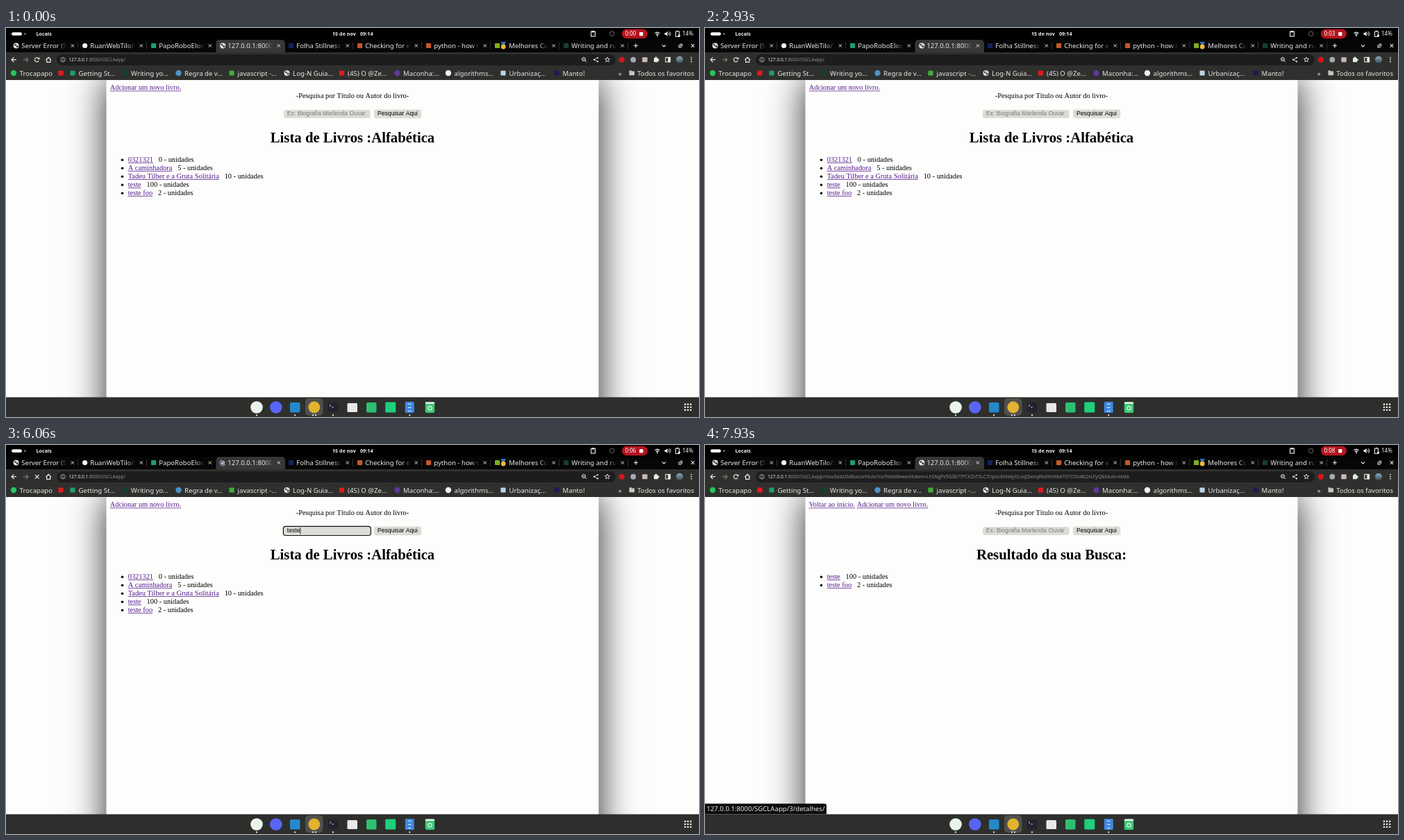
These frames come from a looping animation (998 px wide and 561 px high, 8 s). An HTML page with a canvas:

```html
<!DOCTYPE html>
<html lang="pt-BR">
<head>
<meta charset="utf-8">
<title>Lista de Livros</title>
<style>
html, body { margin: 0; width: 100%; height: 100%; overflow: hidden; background: #fdfdfc; }
canvas { display: block; width: 998px; height: 561px; }
</style>
</head>
<body>
<canvas id="stage"></canvas>
<script>
const W = 998, H = 561, LOOP = 8000;
const cv = document.getElementById('stage');
const dpr = window.devicePixelRatio || 1;
cv.width = W * dpr;
cv.height = H * dpr;
const c = cv.getContext('2d');
c.scale(dpr, dpr);

const UI = '9.6px "Noto Sans", sans-serif';
const URL_FONT = '6.6px "Noto Sans", sans-serif';
const BAR = 'bold 7.2px "Noto Sans", sans-serif';
const PAGE = '10.38px "Liberation Serif", serif';
const HEAD = 'bold 20.76px "Liberation Serif", serif';
const FORM = '8.65px "Liberation Sans", sans-serif';
const LIGHT = '#e8e8e6', DIM = '#8d8e8b', LINK = '#551a8b', PANEL = '#2f302d';

function text(s, x, y, font, color, align = 'left') {
  c.font = font;
  c.fillStyle = color;
  c.textAlign = align;
  c.fillText(s, x, y);
  return c.measureText(s).width;
}
function rect(x, y, w, h, color, r = 0) {
  c.fillStyle = color;
  c.beginPath();
  c.roundRect(x, y, w, h, r);
  c.fill();
}
function disc(x, y, r, color) {
  c.fillStyle = color;
  c.beginPath();
  c.arc(x, y, r, 0, 7);
  c.fill();
}
function ring(x, y, r, color, lw = 1, a = 0, b = Math.PI * 2) {
  c.strokeStyle = color;
  c.lineWidth = lw;
  c.beginPath();
  c.arc(x, y, r, a, b);
  c.stroke();
}
// Each argument after lw is one polyline: [x0, y0, x1, y1, ...]
function line(color, lw, ...paths) {
  c.strokeStyle = color;
  c.lineWidth = lw;
  c.beginPath();
  for (const p of paths)
    for (let i = 0; i < p.length; i += 2) c[i ? 'lineTo' : 'moveTo'](p[i], p[i + 1]);
  c.stroke();
}
function poly(color, ...p) {
  c.fillStyle = color;
  c.beginPath();
  for (let i = 0; i < p.length; i += 2) c.lineTo(p[i], p[i + 1]);
  c.fill();
}
function cross(x, y, r, color, lw = 1) {
  line(color, lw, [x - r, y - r, x + r, y + r], [x + r, y - r, x - r, y + r]);
}
function globe(x, y, r = 4) {
  disc(x, y, r, '#e4e5e3');
  disc(x - r * .3, y - r * .3, r * .35, '#3c3d3b');
  disc(x + r * .4, y + r * .25, r * .38, '#3c3d3b');
}
function badge(kind, x, y, color, r = 4) {
  if (kind === 'globe') globe(x, y);
  else if (kind === 'disc') disc(x, y, r, color);
  else rect(x - r, y - r, r * 2, r * 2, color, 1);
}

const tabs = [
  ['Server Error (500)', 'globe'],
  ['RuanWebTilo/Saldo', 'disc', '#f2f2f2'],
  ['PapoRoboElos', 'square', '#1f9d6b'],
  ['127.0.0.1:8000/SG', 'globe'],
  ['Folha Stillness', 'square', '#15205c'],
  ['Checking for empty', 'square', '#c4582a'],
  ['python - how to', 'square', '#c4582a'],
  ['Melhores Cursos', 'square', '#7fae1e'],
  ['Writing and running', 'square', '#12402f']
];
const marks = [
  [11, 'Trocapapo', 'disc', '#25c45a'],
  [79, '', 'square', '#e01b22'],
  [96, 'Getting St…', 'square', '#1f9d6b'],
  [171.5, 'Writing yo…', 'square', '#12402f'],
  [248.5, 'Regra de v…', 'disc', '#4a94c8'],
  [325, 'javascript -…', 'square', '#3fae3a'],
  [404.5, 'Log-N Guia…', 'globe'],
  [483.5, '(45) O @Ze…', 'square', '#e01b22'],
  [563.5, 'Maconha:…', 'disc', '#5b3a9c'],
  [637, 'algorithms…', 'disc', '#f2f2f2'],
  [716, 'Urbanizaç…', 'square', '#b9d3e6'],
  [793, 'Manto!', 'square', '#1c1c50']
];
const books = [
  ['0321321', 0], ['A caminhadora', 5], ['Tadeu Tilber e a Gruta Solitária', 10],
  ['teste', 100], ['teste foo', 2]
];
const recent = ['a', 'po', 'tadeu', 'dasdsdas', 'Farofa', 'fo'];
const matches = ['TesteUnidade<0', 'teste', 'teste foo'];
const keys = [[5770, 'teste'], [5700, 'test'], [5490, 'tes'], [5350, 'te'], [5280, 't']];
const query = '/resultadoDaBusca/titulo?csrfmiddlewaretoken=LhSNgFV9GSB77PCKZsT0LC7UpsUbVH4yOLoqQlenqRkdXmhbe701COziAE2nLFyQ&titulo=teste';

const FOCUS = 3530, POPUP = 3570, TYPE = 5280, SUBMIT = 5965, COMMIT = 6150, LOADED = 6570, HOVER = 7670;

function topBar(t) {
  rect(0, 0, W, 17, '#000');
  rect(8, 6.3, 15, 4.4, '#fff', 2.2);
  disc(27.5, 8.5, 1.3, '#8a8a8a');
  text('Locais', 43.5, 11, BAR, '#f2f2f2');
  text('15 de nov', 470, 11, BAR, '#f2f2f2');
  text('09:14', 528.5, 11, BAR, '#f2f2f2', 'right');

  c.strokeStyle = '#f2f2f2';
  c.lineWidth = 1.1;
  c.strokeRect(842.6, 5, 5.8, 7);
  rect(844, 4, 3, 2.4, '#f2f2f2');
  ring(872.7, 8.3, 3.3, '#6c6c6c', 1);

  rect(887, 1.6, 37, 13.6, '#b3141f', 6.8);
  const sec = t < 920 ? 0 : Math.floor((t - 930) / 1000 + 1.001);
  text('0:0' + sec, 891.5, 11.2, '8px "Noto Sans", sans-serif', '#fff');
  rect(912.2, 6, 5.2, 5.2, '#fff', .6);

  for (const r of [2.6, 5]) ring(938, 11.5, r, '#f2f2f2', 1.3, -2.3, -.84);
  disc(938, 11.2, 1, '#f2f2f2');
  poly('#f2f2f2', 948.5, 7, 950.3, 7, 952.6, 4.8, 952.6, 12, 950.3, 9.8, 948.5, 9.8);
  ring(952.8, 8.4, 2, '#f2f2f2', 1, -1, 1);
  ring(952.8, 8.4, 4, '#f2f2f2', 1, -1, 1);
  c.strokeStyle = '#f2f2f2';
  c.strokeRect(964.5, 5, 5, 7.5);
  rect(966, 3.8, 2, 1.2, '#f2f2f2');
  disc(969.5, 11, 1.7, '#f2f2f2');
  text('14%', 974, 11.2, '8px "Noto Sans", sans-serif', '#f2f2f2');
}

function tabStrip(t) {
  rect(0, 17, W, 18, '#060606');
  rect(302.5, 17, 99.5, 24, '#373835', 5);
  tabs.forEach(([name, kind, color], i) => {
    const x = 14 + i * 99, on = i === 3;
    if (on && t >= SUBMIT && t < LOADED) {
      const a = (t - SUBMIT) / 150;
      globe(x + 1.5, 25.5, 2.6);
      ring(x + 1.5, 25.5, 4.2, '#8ab4f8', 1.1, a, a + 3.6);
    } else badge(kind, x + (on ? 1.2 : .6), 25.5, color, 3.6);
    let tx = x + 8.2;
    if (i === 7) {
      poly('#3d6fc0', tx - 3, 20, tx + 5, 20, tx + 2, 25, tx, 25);
      disc(tx + 1, 27, 3.4, '#e9b93a');
      tx += 9;
    }
    c.save();
    c.beginPath();
    c.rect(tx, 17, x + 73.5 - tx, 18);
    c.clip();
    const fade = c.createLinearGradient(x + 61, 0, x + 73.5, 0);
    fade.addColorStop(0, LIGHT);
    fade.addColorStop(1, 'rgba(232,232,230,0)');
    text(name, tx, 29, UI, fade);
    c.restore();
    cross(x + 81.8, 25.5, 2.1, LIGHT);
    if (i !== 2 && !on) rect(x + 89, 20.5, .8, 10, '#3e3f3c');
  });
  line(LIGHT, 1.2, [904, 25.5, 910, 25.5], [907, 22.5, 907, 28.5]);
  line(LIGHT, 1.1, [945, 24.5, 947.5, 27, 950, 24.5]);
  c.strokeStyle = LIGHT;
  c.lineWidth = 1;
  c.strokeRect(969, 25, 3, 3);
  line(LIGHT, 1, [970.5, 23.2, 973.8, 23.2, 973.8, 26.7]);
  cross(989, 25.5, 2.3, LIGHT, 1.1);
}

function toolBar(t) {
  rect(0, 35, W, 40, PANEL);
  const y = 45.7;
  line(LIGHT, 1.2, [15, y, 8, y], [11.3, y - 3.3, 8, y, 11.3, y + 3.3]);
  line('#777875', 1.2, [25, y, 32, y], [28.7, y - 3.3, 32, y, 28.7, y + 3.3]);
  if (t >= SUBMIT && t < LOADED) cross(44.7, y, 2.9, LIGHT, 1.2);
  else {
    ring(44.5, y, 3.1, LIGHT, 1.2, .5, 5.5);
    poly(LIGHT, 48.4, 42, 48.4, 45.3, 45, 45.3);
  }
  line(LIGHT, 1.2, [57.4, 46, 61.2, 42.4, 65, 46], [58.7, 45.5, 58.7, 49.3, 63.7, 49.3, 63.7, 45.5]);

  rect(73, 38, 805, 16, '#1d1d20', 8);
  ring(82, y, 3.2, '#b8b9b6', .9);
  rect(81.6, 45.2, .9, 2.6, '#b8b9b6');
  rect(81.6, 43.6, .9, .9, '#b8b9b6');
  const w = text('127.0.0.1', 90.3, 48.2, URL_FONT, LIGHT);
  text(':8000/SGCLAapp' + (t < COMMIT ? '/' : query), 90.3 + w, 48.2, URL_FONT, DIM);

  ring(832, 45, 2.5, LIGHT, 1);
  line(LIGHT, 1, [833.8, 46.8, 836, 49], [830.8, 45, 833.2, 45]);
  line(LIGHT, .9, [852, 43, 847, 45.7, 852, 48.4]);
  for (const [x, yy] of [[852, 43], [847, 45.7], [852, 48.4]]) disc(x, yy, 1.1, LIGHT);
  c.beginPath();
  for (let i = 0; i < 10; i++) {
    const a = i * Math.PI / 5 - Math.PI / 2, r = i % 2 ? 1.7 : 3.7;
    c.lineTo(866 + r * Math.cos(a), y + r * Math.sin(a));
  }
  c.closePath();
  c.strokeStyle = LIGHT;
  c.lineWidth = .9;
  c.stroke();

  disc(886.8, y, 4, '#d8141c');
  disc(903.3, y, 3.9, '#a6abb0');
  rect(916.3, 42.2, 7.4, 7, '#c9b8b6', 1);
  rect(933, 43.2, 6, 6, LIGHT, .8);
  disc(936, 42.8, 1.4, LIGHT);
  disc(939.4, 46, 1.4, LIGHT);
  c.strokeStyle = LIGHT;
  c.lineWidth = 1.1;
  c.strokeRect(949.8, 42.4, 6.8, 6.6);
  rect(953.3, 42.4, 3.3, 6.6, LIGHT);
  const photo = c.createLinearGradient(0, 41, 0, 51);
  photo.addColorStop(0, '#8ba9bd');
  photo.addColorStop(1, '#3b4a50');
  disc(970, y, 5, photo);
  for (const d of [-3, 0, 3]) disc(987, y + d, .9, LIGHT);

  for (const [x, name, kind, color] of marks) {
    badge(kind, x, 65, color, kind === 'disc' ? 4.2 : 3.6);
    text(name, x + 8.6, 68.7, UI, LIGHT);
  }
  text('»', 881.8, 68.5, UI, LIGHT);
  rect(897.5, 62.2, 7.6, 6, '#c4c5c2', .8);
  rect(897.5, 61.2, 3.6, 2, '#c4c5c2', .6);
  text('Todos os favoritos', 991, 68.7, UI, LIGHT, 'right');
}

function link(s, x, y) {
  const w = text(s, x, y, PAGE, LINK);
  rect(x, y + 1.1, w, .8, LINK);
  return w;
}

function page(t) {
  const found = t >= COMMIT;
  rect(0, 75, W, 458, '#fdfdfc');
  c.save();
  c.beginPath();
  c.rect(0, 75, W, 458);
  c.clip();
  c.shadowColor = 'rgba(0,0,0,.85)';
  c.shadowBlur = 50 * dpr;
  rect(144.5, 75, 709, 560, '#fdfdfc');
  c.restore();

  let x = 149.7;
  if (found) x += link('Voltar ao início.', x, 89.3) + 2.6;
  link('Adcionar um novo livro.', x, 89.3);
  text('-Pesquisa por Título ou Autor do livro-', 499, 101.3, PAGE, '#000', 'center');
  text(found ? 'Resultado da sua Busca:' : 'Lista de Livros :Alfabética', 499, 164.8, HEAD, '#000', 'center');
  (found ? books.slice(3) : books).forEach(([name, n], i) => {
    const y = 193.2 + i * 12;
    disc(167.5, y - 3, 1.8, '#000');
    const w = link(name, 175.7, y);
    text(n + ' - unidades', 175.7 + w + 7.8, y, PAGE, '#000');
  });
  searchForm(t, found);
}

function searchForm(t, found) {
  const focus = t >= FOCUS && !found;
  const hit = keys.find(k => t >= k[0]);
  const typed = focus && hit ? hit[1] : '';
  if (focus) rect(398.8, 116.7, 127.2, 14.4, '#101010', 4);
  rect(400, 117.9, 124.8, 12, '#dcddd9', 3);
  rect(530, 117.6, 68.3, 12.6, '#dcddd9', 3);
  text('Pesquisar Aqui', 535, 126.4, FORM, '#000');
  const w = text(typed || 'Ex: Biografia Marlenda Ouvar', 404.8, 126.4, FORM, typed ? '#000' : '#7a7a78');
  if (focus) rect(404.8 + (typed ? w : 0), 119, .8, 9.6, '#000');
  if (t >= POPUP && t < SUBMIT) popup(t < TYPE ? recent : matches, t < TYPE ? 81 : 93.5);
}

function popup(items, w) {
  const h = items.length * 18.6 + 4.6;
  c.save();
  c.shadowColor = 'rgba(0,0,0,.45)';
  c.shadowBlur = 3 * dpr;
  c.shadowOffsetY = dpr;
  rect(450.6, 135, w, h, '#26272a', 2);
  c.restore();
  poly('#26272a', 456, 135.2, 461, 130.3, 466, 135.2);
  items.forEach((s, i) => text(s, 457, 150.2 + i * 18.65, UI, '#dededc'));
}

function statusBubble(t) {
  if (t < HOVER) return;
  c.save();
  c.globalAlpha = Math.min(1, (t - HOVER + 40) / 120);
  rect(0, 517.3, 175, 15.2, '#0c0c0c', [0, 3, 0, 0]);
  text('127.0.0.1:8000/SGCLAapp/3/detalhes/', 2.3, 528.3, UI, LIGHT);
  c.restore();
}

function dock() {
  const y = 547;
  rect(0, 532.5, W, 28.5, '#2e2f2c');
  rect(431, 534, 25.5, 25, '#50514e', 5);
  disc(361, y, 8.8, '#e9f3ec');
  disc(388.8, y, 8.8, '#5865f2');
  rect(409, 540, 14.5, 14.5, '#2489ca', 2);
  disc(443.8, y, 8.4, '#e2b32f');
  rect(463.5, 540, 15, 14, '#23232f', 2);
  line('#c9c9d0', .9, [466, 543, 468, 544.5, 466, 546], [469, 546.8, 472, 546.8]);
  rect(491.5, 541, 14.5, 13, '#e8e8e8', 1.5);
  rect(519, 540, 14.5, 14.5, '#2fbf71', 2);
  rect(546.3, 539.5, 15, 15, '#1fcf7c', 1.5);
  rect(574.8, 539, 13, 16, '#3f86e0', 1.5);
  for (const d of [0, 5, 10]) rect(578.8, 541.8 + d, 5, 1.2, '#cfe2fa');
  rect(603.8, 539.5, 13.4, 15.5, '#3ec878', 2);
  rect(603.8, 539.5, 13.4, 2.4, '#e6efe9', 1);
  ring(610.5, 548.3, 2.7, '#eafaf0', 1.1);
  for (const x of [361, 416, 442, 446, 471, 581.3]) disc(x, 558.4, 1.1, '#f0f0f0');
  for (let i = 0; i < 9; i++) rect(976.8 + i % 3 * 4.1, 541.6 + Math.floor(i / 3) * 4.1, 2.3, 2.3, '#e8e8e6', .5);
}

function draw(t) {
  page(t);
  topBar(t);
  tabStrip(t);
  toolBar(t);
  statusBubble(t);
  dock();
}

const start = performance.now();
function tick() {
  draw((performance.now() - start) % LOOP);
  requestAnimationFrame(tick);
}
tick();
</script>
</body>
</html>
```
